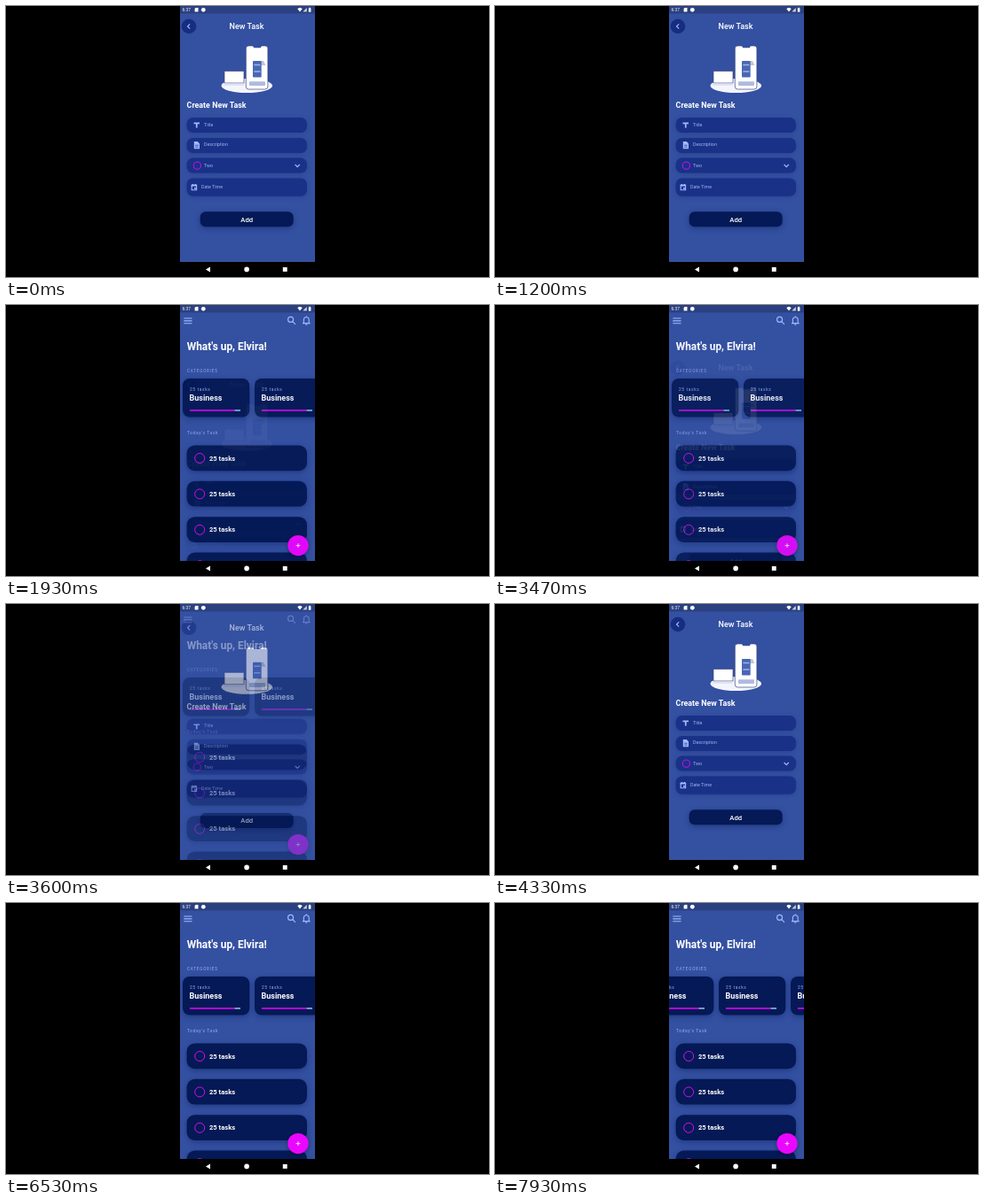
Animation of 544x306 px, one loop 8 s. Source, as an HTML page:

```html
<!DOCTYPE html>
<html lang="en">
<head>
<meta charset="utf-8">
<title>Task app</title>
<style>
  html, body { margin: 0; width: 100%; height: 100%; overflow: hidden; background: #000; }
  svg { display: block; width: 544px; height: 306px; font-family: Roboto, sans-serif; }
  text { fill: #fff; }
  .bold { font-weight: 700; }
  .medium { font-weight: 500; }
  .hint { fill: #a3b6f0; font-size: 5.3px; }
  .label { fill: #98b0f5; font-size: 4.8px; letter-spacing: .65px; }
  .line { fill: none; stroke: #a3bbff; stroke-width: 1.1; }
  .soft { fill: #a3bbff; }
  .field { fill: #193187; filter: drop-shadow(0 1.5px 2px #0f206040); }
  .card { fill: #041955; filter: drop-shadow(0 2px 3px #04195566); }
  .ring { fill: none; stroke: #d60cf0; stroke-width: 1; }
  .bar { fill: none; stroke-width: 1.5; }
</style>
</head>
<body>
<svg viewBox="0 0 544 306">
  <defs>
    <clipPath id="screen"><rect x="196" width="152" height="289"/></clipPath>
    <g id="category">
      <rect class="card" x="199" y="83" width="75.3" height="43.5" rx="8"/>
      <text class="label" x="207" y="97">25 tasks</text>
      <text class="bold" x="206.5" y="108" font-size="9">Business</text>
      <path class="bar" d="M207 119H257.5" stroke="#eb06ff"/>
      <path class="bar" d="M257.5 119H264" stroke="#8fc9f0"/>
    </g>
    <g id="row">
      <rect class="card" x="203.6" y="158.4" width="135.4" height="28.8" rx="9"/>
      <circle class="ring" cx="218.2" cy="173" r="5.5"/>
      <text class="bold" x="229" y="175.6" font-size="7.6">25 tasks</text>
    </g>
  </defs>

  <g clip-path="url(#screen)">
    <g id="home">
      <rect x="196" width="152" height="289" fill="#3450a1"/>
      <path class="line" d="M200.3 15H209.5M200.3 17.9H209.5M200.3 20.8H209.5"/>
      <g class="line">
        <circle cx="320.6" cy="16.4" r="3"/>
        <path d="M322.8 18.6L326 21.8"/>
        <path d="M334 20.6H342.6M335.4 20.4V17A2.9 3.2 0 0 1 341.2 17V20.4M338.3 12.6V14"/>
      </g>
      <path class="soft" d="M337 21.5H339.6A1.3 1.3 0 0 1 337 21.5"/>
      <text class="bold" x="203.8" y="51" font-size="11.9">What's up, Elvira!</text>
      <text class="label" x="204" y="76.3" style="font-size:4.5px;letter-spacing:.85px">CATEGORIES</text>
      <g id="categories">
        <use href="#category"/>
        <use href="#category" x="81"/>
        <use href="#category" x="162"/>
      </g>
      <text class="label" x="204" y="146">Today's Task</text>
      <use href="#row"/>
      <use href="#row" y="40.4"/>
      <use href="#row" y="80.8"/>
      <use href="#row" y="121.2"/>
      <circle cx="329" cy="271.6" r="11.7" fill="#eb06ff" style="filter:drop-shadow(0 1.5px 2px #0006)"/>
      <path d="M326.6 271.6H331.4M329 269.2V274" stroke="#fff" stroke-width=".8"/>
    </g>

    <g id="task">
      <rect x="196" width="152" height="289" fill="#3450a1"/>
      <circle cx="206" cy="23" r="8.3" fill="#172d80"/>
      <path class="line" d="M207.2 20.3L204.5 23L207.2 25.7"/>
      <text class="medium" x="271" y="26.2" font-size="9" text-anchor="middle">New Task</text>

      <ellipse cx="271.3" cy="90" rx="28.8" ry="8" fill="#f4f5fc"/>
      <path d="M246 73.5H268V87H246Z" fill="#fff" stroke="#41467e" stroke-width=".7"/>
      <path d="M243.5 87.5H269L267 90H246Z" fill="#dfe3f5"/>
      <rect x="270.3" y="45" width="24.6" height="49" rx="3" fill="#fff" stroke="#3d4785" stroke-width=".7"/>
      <path d="M278 45H288L286.8 47.2H279.2Z" fill="#3450a1"/>
      <path d="M287 62H290L292.5 67H287Z" fill="#c4c6d4"/>
      <rect x="278" y="62" width="9.7" height="18.5" rx=".8" fill="#4867b5"/>
      <path d="M279.4 66.5H286.4M279.4 74H286.4" stroke="#9db4e8" stroke-width="1.4"/>
      <rect x="274" y="85.3" width="18" height="4.8" rx=".8" fill="#aebbe0"/>

      <text class="bold" x="203.6" y="115.4" font-size="8.9">Create New Task</text>
      <rect class="field" x="203.6" y="126" width="135.4" height="17" rx="7"/>
      <rect class="field" x="203.6" y="149" width="135.4" height="17" rx="7"/>
      <rect class="field" x="203.6" y="171.6" width="135.4" height="17" rx="7"/>
      <rect class="field" x="203.6" y="194.5" width="135.4" height="20.3" rx="7"/>
      <path class="soft" d="M211.5 131.6H218V133.2H215.6V137.5H213.9V133.2H211.5Z"/>
      <path class="soft" d="M211.8 153H215.8L218 155.2V161.2H211.8Z"/>
      <path d="M213 157.2H216.8M213 159.2H216.8" stroke="#193187" stroke-width=".7"/>
      <circle class="ring" cx="215.4" cy="180.2" r="4.1"/>
      <path class="line" d="M325.6 179L328.2 181.6L330.8 179"/>
      <path class="line" d="M209.2 202.3H214.6V207.7H209.2ZM210.4 200.9V202M213.4 200.9V202" stroke-width=".8"/>
      <path class="soft" d="M208.8 201.8H215V203.6H208.8ZM212 205H213.8V206.8H212Z"/>
      <text class="hint" x="223" y="135.6">Title</text>
      <text class="hint" x="223" y="158.4">Description</text>
      <text class="hint" x="223" y="182">Two</text>
      <text class="hint" x="220" y="206.4">Date Time</text>
      <rect class="card" x="218.7" y="232.3" width="105" height="17" rx="6"/>
      <text class="medium" x="271.2" y="243.6" font-size="7.7" text-anchor="middle">Add</text>
    </g>

    <rect x="196" width="152" height="8.5" opacity=".2"/>
    <g fill="#fff">
      <text x="198.6" y="6.2" font-size="4.8">6:37</text>
      <path d="M213.6 2H216.5V6.6H212.6V3Z"/>
      <circle cx="222.3" cy="4.3" r="2.4"/>
      <path d="M328.3 3.2Q331 1 333.7 3.2L331 6.6Z"/>
      <path d="M338.8 2V6.6H334.4Z" opacity=".75"/>
      <path d="M340.8 2.4H341.5V1.8H342.7V2.4H343.4V6.7H340.8Z"/>
    </g>
  </g>

  <g fill="#fff">
    <path d="M225 297.4L230 294.4V300.4Z"/>
    <circle cx="271.1" cy="297.4" r="2.8"/>
    <rect x="311.8" y="295" width="4.9" height="4.9"/>
  </g>
</svg>
<script>
const LOOP = 8000;
const SLIDE = 72;
const task = document.getElementById('task');
const categories = document.getElementById('categories');

const clamp = v => Math.min(1, Math.max(0, v));
const progress = (t, start, length) => clamp((t - start) / length);
const bezier = (s, a, b) => 3 * (1 - s) * (1 - s) * s * a + 3 * (1 - s) * s * s * b + s ** 3;

function cubic(x1, y1, x2, y2) {
  return x => {
    let low = 0, high = 1;
    for (let i = 0; i < 20; i++) {
      const mid = (low + high) / 2;
      if (bezier(mid, x1, x2) < x) low = mid; else high = mid;
    }
    return bezier(high, y1, y2);
  };
}
const fastOutSlowIn = cubic(.4, 0, .2, 1);
const easeIn = cubic(.42, 0, 1, 1);
const smooth = cubic(.42, 0, .58, 1);

function draw(t) {
  // The task page closes, opens and closes again.
  const open = clamp(1 - progress(t, 1720, 250) + progress(t, 3385, 300) - progress(t, 5795, 300));
  task.setAttribute('opacity', easeIn(open));
  task.setAttribute('transform', `translate(0 ${SLIDE * (1 - fastOutSlowIn(open))})`);
  task.style.display = open > 0 ? '' : 'none';
  categories.setAttribute('transform', `translate(${-28 * smooth(progress(t, 7480, 450))} 0)`);
}

function tick() {
  draw(performance.now() % LOOP);
  requestAnimationFrame(tick);
}
tick();
</script>
</body>
</html>
```
